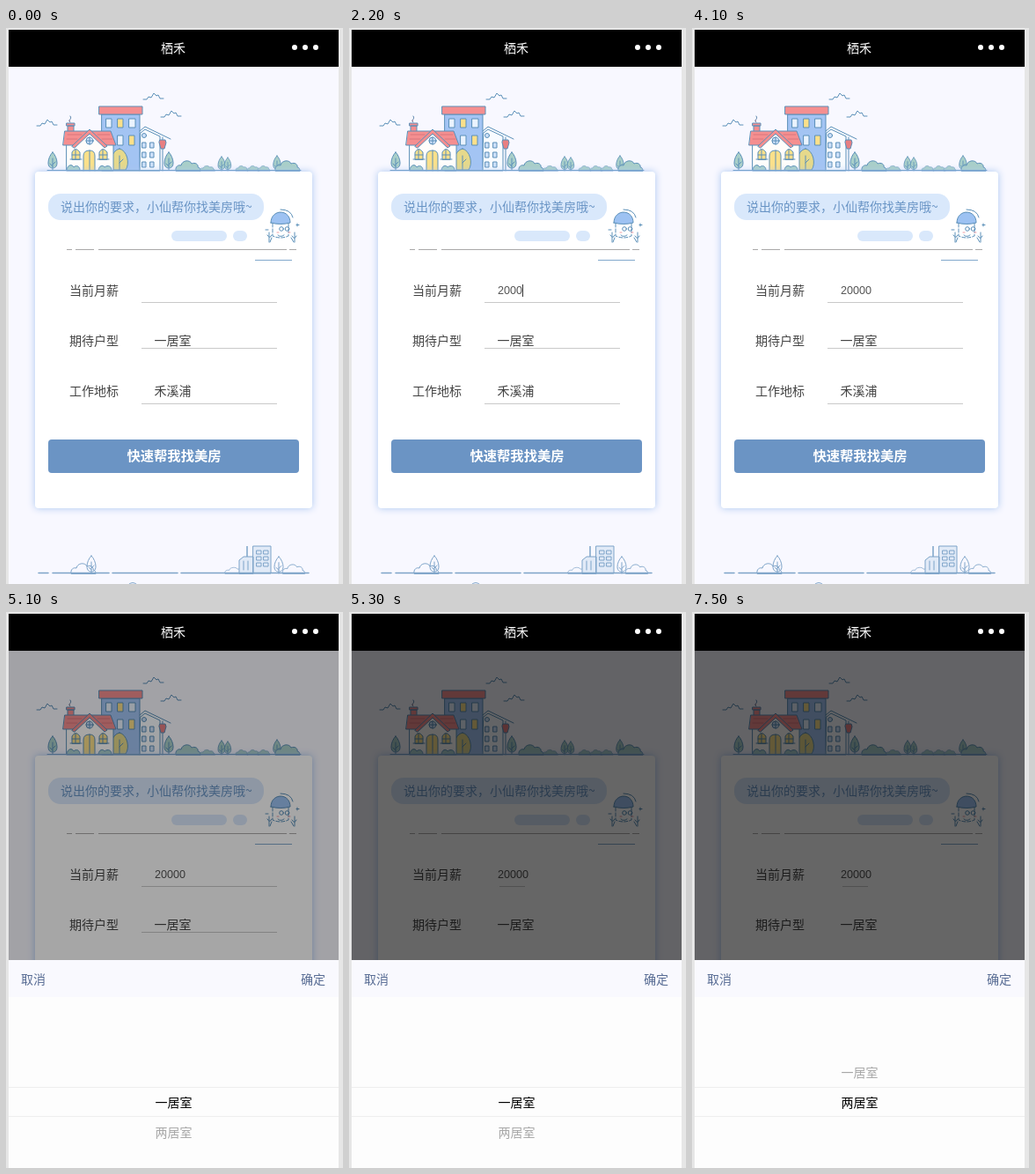
An HTML page for the animation above (8 s loop, 383 by 631 pixels).

```html
<!DOCTYPE html>
<html lang="zh-CN">
<head>
<meta charset="utf-8">
<title>找房表单</title>
<style>
html, body { margin: 0; width: 100%; height: 100%; overflow: hidden; background: #e6e6e6; }
body { position: relative; font: 14px/20px "Noto Sans CJK SC", "Noto Sans CJK", sans-serif; }
svg, div { position: absolute; }
svg { left: 0; top: 0; }
svg text { font-size: 14px; font-weight: 300; fill: #444; }
.line { fill: none; stroke: #5a8fb8; stroke-width: 1; stroke-linejoin: round; stroke-linecap: round; }
.line * { vector-effect: non-scaling-stroke; }
.card { fill: #fff; filter: drop-shadow(0 0 4px #a9c6f0); }
.anim, .shade, .sheet, .list, .rule, .stub { animation: 8s step-end infinite; }

.typed { left: 169px; top: 291px; width: 0; height: 14px; overflow: hidden; white-space: nowrap;
  font: 12.6px/14px "Liberation Sans", Arial, sans-serif; color: #555;
  border-right: 1px solid transparent; animation-name: type, caret; }
.caret { left: 211px; top: 405px; width: 1px; height: 14px; background: #333; animation-name: second-caret; }
.rule { stroke: #c9c9c9; animation-name: hide-rule; }
.stub { stroke: #c9c9c9; animation-name: show-stub; }
.shade { left: 3px; top: 44px; width: 375px; height: 587px; background: #000; animation-name: shade; }
.sheet { left: 3px; top: 395px; width: 375px; height: 236px; background: #fdfdfd; overflow: hidden; animation-name: show-sheet; }
.bar { left: 0; top: 0; width: 375px; height: 42px; background: #f9f9fe; color: #586c94; }
.bar div { top: 11px; }
.list { left: 0; top: 144px; width: 100%; text-align: center; line-height: 34px; color: #000; animation-name: roll; }
.veil { left: 0; width: 100%; background: rgba(253, 253, 253, .66); box-sizing: border-box; }
.veil.top { top: 42px; height: 103px; border-bottom: 1px solid #eee; }
.veil.low { top: 177px; height: 60px; border-top: 1px solid #eee; }

@keyframes type {
  0% { width: 0 } 22.5% { width: 7px } 23.75% { width: 14px } 26.25% { width: 21px }
  27.5% { width: 28px } 33.75%, 100% { width: 35px }
}
@keyframes caret {
  0%, 16.25%, 32.5%, 38.75%, 100% { border-color: transparent }
  11.25%, 22.5%, 33.75% { border-color: #333 }
}
@keyframes second-caret { 0%, 51.25%, 100% { opacity: 0 } 46.25% { opacity: 1 } }
@keyframes shade { 0% { opacity: 0 } 63.75% { opacity: .35 } 65% { opacity: .59 } 66.25%, 100% { opacity: .6 } }
@keyframes show-sheet { 0% { visibility: hidden } 63.75%, 100% { visibility: visible } }
@keyframes hide-rule { 0% { opacity: 1 } 65%, 100% { opacity: 0 } }
@keyframes show-stub { 0% { opacity: 0 } 65%, 100% { opacity: 1 } }
@keyframes roll {
  0% { transform: none } 90% { transform: translateY(-4px) } 91.25% { transform: translateY(-16px) }
  92.5% { transform: translateY(-28px) } 93.75%, 100% { transform: translateY(-34px) }
}
</style>
</head>
<body>
<svg width="383" height="631" viewBox="0 0 383 631">
  <defs>
    <g id="tree">
      <path d="M0-20C-3-17-5-12-5-8C-5-3-2-2 0-2S5-3 5-8C5-12 3-17 0-20Z"/>
      <path d="M0-13V0M0-6l3-3M0-4l-3-3" fill="none"/>
    </g>
    <path id="bush" d="M-14 0C-15-5-11-7-8-6C-7-12 2-13 4-8C8-10 12-7 11-4C14-4 14 0 14 0Z"/>
    <path id="cloud" d="M0 8h4l2-3 3 1 3-5 3 3 2-1 2 4h4"/>
  </defs>
  <path d="M3 44H378V631H3Z" fill="#f8f8ff"/>
  <path d="M3 2H378V44H3Z"/>
  <text x="190" y="28" text-anchor="middle" style="fill:#fff;font-weight:500">栖禾</text>
  <g fill="#fff"><circle cx="328" cy="22" r="3"/><circle cx="340" cy="22" r="3"/><circle cx="352" cy="22" r="3"/></g>

  <!-- Street above the card -->
  <g class="line">
    <use href="#cloud" x="35" y="103"/><use href="#cloud" x="156" y="73"/><use href="#cloud" x="176" y="93"/>
    <g fill="#a9cfc9">
      <use href="#tree" x="53" y="161"/><use href="#tree" x="185" y="161"/>
      <use href="#bush" x="207" y="162"/><use href="#bush" transform="translate(229 162) scale(.6 .5)"/>
      <use href="#tree" transform="translate(245 162) scale(.8)"/><use href="#tree" transform="translate(252 162) scale(.75)"/>
      <use href="#bush" transform="translate(268 162) scale(.5)"/><use href="#bush" transform="translate(281 162) scale(.5)"/>
      <use href="#bush" transform="translate(293 162) scale(.5)"/><use href="#tree" transform="translate(308 162) scale(.85)"/>
      <use href="#bush" x="320" y="162"/>
    </g>
    <path d="M152 117l6-5 29 14M153 119l5-4 17 8V162H152Z" fill="#f8fbff"/>
    <circle cx="157" cy="122" r="2.5" fill="#cfe2fa"/>
    <path d="M155 130h4v6h-4ZM164 130h4v6h-4ZM155 141h4v6h-4ZM164 141h4v6h-4ZM155 152h4v6h-4ZM164 152h4v6h-4Z" fill="#cfe2fa"/>
    <path d="M178 137V162M178 124v3" />
    <path d="M175 127h6l1 3-2 7h-4l-2-7Z" fill="#e87f82"/>
    <path d="M109 98H152V162H109Z" fill="#a3c4f3"/>
    <path d="M106 89H155V98H106Z" fill="#f58f90"/>
    <path d="M114 103h6v10h-6ZM140 103h7v10h-7ZM127 122h6v11h-6Z" fill="#eaf3ff"/>
    <path d="M127 103h6v10h-6ZM140 122h6v11h-6Z" fill="#fbe08a"/>
    <path d="M129 137C119 139 117 155 122 161H136C141 154 138 139 129 137ZM129 145V161M129 153l4-4" fill="#e6d98b"/>
    <path d="M70 117V111H77V117M69 108h9v3h-9ZM73 107c-4-3 3-3 0-7" fill="#f58f90"/>
    <path d="M69 132H122V162H69Z" fill="#fffdfb"/>
    <path d="M67 117H119L125 133H65Z" fill="#f58f90"/>
    <path d="M77 135L95 118L113 135V162H77Z" fill="#fffdfb" stroke="none"/>
    <path d="M75 134L95 115L115 134L112 136L95 120L78 136Z" fill="#f58f90"/>
    <path d="M70 121h16M69 126h12M104 121h14M109 126h12" stroke="#d8767c"/>
    <circle cx="95" cy="128" r="4" fill="#cfe2fa"/><path d="M91 128h8M95 124v8"/>
    <path d="M88 162V145Q88 139 95 139Q101 139 101 145V162M95 139V162" fill="#fbe08a"/>
    <path d="M75 149V141Q79 134 84 141V149ZM79 138V149M75 144h9M106 149V141Q110 134 115 141V149ZM110 138V149M106 144h9M73 149h13M104 149h13" fill="#fbe08a"/>
    <path d="M69 161c1-6 6-7 8-3 3-3 7-1 7 3M105 161c1-5 5-6 7-3 4-3 8-1 8 3" fill="#a9cfc9"/>
    <path d="M47 161.5H335"/>
  </g>

  <!-- Card -->
  <rect class="card" x="33" y="163" width="315" height="382" rx="4"/>
  <g fill="#d9e8fb">
    <rect x="48" y="188" width="245" height="30" rx="14"/>
    <rect x="188" y="230" width="63" height="12" rx="6"/>
    <rect x="258" y="230" width="16" height="12" rx="6"/>
  </g>
  <text x="62" y="208" style="fill:#6994c5;font-weight:400">说出你的要求，小仙帮你找美房哦~</text>
  <path d="M69 251.5h6M79 251.5h21M105 251.5h214M322 251.5h8" stroke="#aaa9a9"/>
  <path d="M283 263.5h42" stroke="#82a9cc"/>
  <g class="line">
    <path d="M303 222V236Q312 240 321 236V222" fill="#fff" stroke-dasharray="4 2"/>
    <path d="M301 221C301 205 323 205 323 221Q312 224 301 221Z" fill="#9dc2f2"/>
    <path d="M312 206q12 0 14 9M299 232v11M297 235q3 5 5 0M328 232v11M325 236q3 5 5 0M309 235q3 3 7 0M295 229h3M331 222v3M330 223.5h3M302 238l-2 5M324 238l3 5"/>
    <circle cx="313" cy="228" r="2.3"/><circle cx="319.500" cy="228" r="2.3"/>
    <path d="M308 232h2M321 232h2" stroke="#ef9ca4"/>
  </g>
  <text x="72" y="303">当前月薪</text>
  <text x="72" y="360">期待户型</text>
  <text x="72" y="417">工作地标</text>
  <text x="168.500" y="360">一居室</text>
  <text x="168.500" y="417">禾溪浦</text>
  <path class="rule" d="M154 311.500H308"/>
  <path class="stub" d="M171 311.500H200"/>
  <path d="M154 426.500H308" stroke="#c9c9c9"/>
  <path class="rule" d="M154 363.500H308"/>
  <rect x="48" y="467" width="285" height="38" rx="4" fill="#6b94c4"/>
  <text x="191" y="491" text-anchor="middle" style="font-size:15.3px;font-weight:700;fill:#fff">快速帮我找美房</text>

  <!-- Street below the card -->
  <g class="line" style="stroke:#7da3c8" fill="#e1eaf7">
    <use href="#bush" x="88" y="619"/><use href="#tree" x="97" y="619"/>
    <use href="#bush" transform="translate(260 619) scale(.8 .6)"/>
    <path d="M265 619V604l5-4h4v-12h0v12h7V619ZM281 588H301V619H281Z" fill="#e1eaf7"/>
    <path d="M285 593h5v4h-5ZM293 593h5v4h-5ZM285 600h5v4h-5ZM293 600h5v4h-5ZM285 607h5v4h-5ZM293 607h5v4h-5ZM270 605v10M275 605v10"/>
    <use href="#tree" transform="translate(310 619) scale(1 .95)"/>
    <use href="#bush" transform="translate(327 619) scale(.9)"/>
    <path d="M37 618.500h11M53 618.500h64M121 618.500h74M199 618.500H344" stroke-width="1.500"/>
    <path d="M140 631q4-3 8 0"/>
  </g>
</svg>

<div class="anim typed">20000</div>
<div class="anim caret"></div>
<div class="shade"></div>
<div class="sheet">
  <div class="list">一居室<br>两居室</div>
  <div class="veil top"></div>
  <div class="veil low"></div>
  <div class="bar"><div style="left:14px">取消</div><div style="right:15px">确定</div></div>
</div>
</body>
</html>
```
